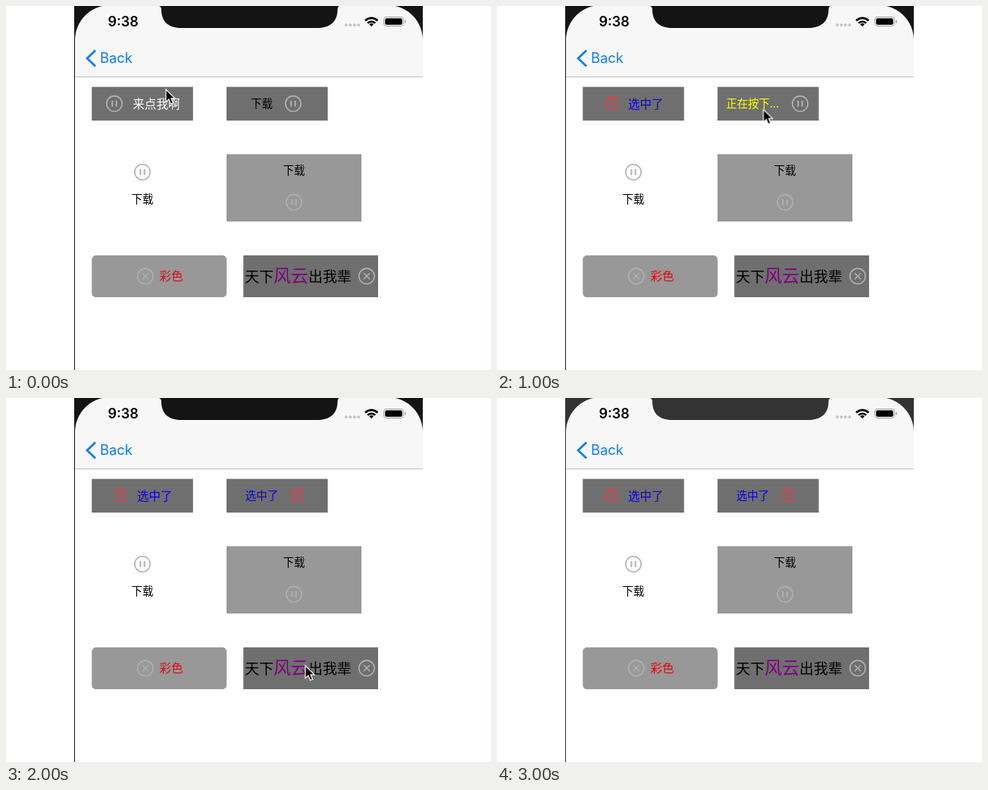
These frames come from a looping animation (640 px wide and 480 px high, 3.5 s). An HTML page:

```html
<!DOCTYPE html>
<html lang="zh-CN">
<head>
<meta charset="utf-8">
<title>Button states</title>
<style>
html, body { margin: 0; width: 100%; height: 100%; overflow: hidden; background: #fff; }
svg { display: block; width: 640px; height: 480px; }
text { font: 15.56px "Noto Sans CJK SC", "Noto Sans CJK", sans-serif; }
.small { font-size: 14.44px; }
.title { font-size: 18.89px; }
.ui { font-family: Inter, sans-serif; }
.dark { fill: #6f6f6f; }
.light { fill: #989898; }
.icon { fill: none; stroke: #b1b1b1; stroke-width: 1.6; }
.trash { fill: none; stroke: #d9444c; stroke-width: 1.5; }
.chosen { fill: #0a00e0; }

/* Seven equal steps of 500 ms, all with hard changes. */
.bezel, .cursor, .state { animation: 3500ms step-end infinite; }
.bezel { fill: #141414; animation-name: bezel; }
.cursor { animation-name: cursor; }
.first-off { animation-name: until1; }
.first-on { animation-name: from1; }
.second-off { animation-name: until2; }
.second-down { animation-name: during2; }
.second-on { animation-name: from3; }
.last-off { animation-name: except3; }
.last-down { animation-name: during3; }

@keyframes bezel { 0% { fill: #141414; } 85.714% { fill: #333; } }
@keyframes until1 { 0% { visibility: visible; } 14.285%, 100% { visibility: hidden; } }
@keyframes from1 { 0% { visibility: hidden; } 14.285%, 100% { visibility: visible; } }
@keyframes until2 { 0% { visibility: visible; } 28.571%, 100% { visibility: hidden; } }
@keyframes during2 { 0% { visibility: hidden; } 28.571% { visibility: visible; } 42.857%, 100% { visibility: hidden; } }
@keyframes from3 { 0% { visibility: hidden; } 42.857%, 100% { visibility: visible; } }
@keyframes during3 { 0% { visibility: hidden; } 42.857% { visibility: visible; } 57.142%, 100% { visibility: hidden; } }
@keyframes except3 { 0% { visibility: visible; } 42.857% { visibility: hidden; } 57.142%, 100% { visibility: visible; } }
@keyframes cursor {
  0% { transform: translate(211px, 110px); visibility: visible; }
  14.285% { transform: translate(347px, 141px); visibility: visible; }
  28.571% { transform: translate(351.5px, 136.5px); visibility: visible; }
  42.857% { transform: translate(395px, 353px); visibility: visible; }
  71.428%, 100% { transform: translate(395px, 353px); visibility: hidden; }
}
</style>
</head>
<body>
<svg viewBox="0 0 640 480">
  <defs>
    <g id="pause">
      <circle r="10.2"/>
      <path d="M-2.7-4V4M2.7-4V4" stroke-width="2"/>
    </g>
    <g id="cross">
      <circle r="10.2"/>
      <path d="M-4-4L4 4M4-4L-4 4"/>
    </g>
    <g id="trash">
      <path d="M-8-4.7H8M-4-4.7V-8H4V-4.7M-6.4-4.7V6Q-6.4 8-4.4 8H4.4Q6.4 8 6.4 6V-4.7M-2.3-1V4M2.3-1V4"/>
    </g>
  </defs>

  <!-- Phone frame and navigation bar -->
  <path class="bezel" d="M90 0H550V45H91V480H90Z"/>
  <path fill="#f7f7f7" d="M91 93V45A46 46 0 0 1 137-1H504A46 46 0 0 1 550 45V93Z"/>
  <path fill="#bdbdbd" d="M91 93H550V94H91Z"/>
  <path class="bezel" d="M202 0Q205 1 205 5C205 20 214 29 231 29H411C428 29 437.5 20 437.5 5Q437.5 1 440 0Z"/>

  <text class="ui" x="134.5" y="27" style="font-size:18px;font-weight:600">9:38</text>
  <g fill="#c4c4c4">
    <circle cx="449" cy="25" r="2"/><circle cx="454.4" cy="25" r="2"/>
    <circle cx="459.8" cy="25" r="2"/><circle cx="465.2" cy="25" r="2"/>
  </g>
  <g fill="none" stroke="#000" stroke-width="2.7">
    <path d="M474 19.3A11.6 11.6 0 0 1 490.4 19.3M477.2 22.6A7 7 0 0 1 487.2 22.6"/>
    <path d="M482.2 27L479.3 24.2A4.2 4.2 0 0 1 485.1 24.2Z" fill="#000" stroke="none"/>
  </g>
  <rect x="498.5" y="14.5" width="26" height="12" rx="3.6" fill="none" stroke="#a0a0a0"/>
  <rect x="500.2" y="16.2" width="22.6" height="8.6" rx="2"/>
  <path d="M526 18.3Q528 19 528 20.5T526 22.7Z" fill="#a0a0a0"/>

  <path d="M118 58.5L107 69L118 79.5" fill="none" stroke="#0e7bf2" stroke-width="2.8"/>
  <text class="ui" x="124" y="75.3" fill="#0e7bf2" style="font-size:18.4px">Back</text>

  <!-- Icon left -->
  <rect class="dark" x="113.2" y="106.7" width="133.6" height="44.4"/>
  <g class="state first-off">
    <use href="#pause" class="icon" x="143" y="128.8"/>
    <text x="167.3" y="134.6" fill="#fff">来点我啊</text>
  </g>
  <g class="state first-on">
    <use href="#trash" class="trash" x="151" y="128.3"/>
    <text class="chosen" x="173" y="134.6">选中了</text>
  </g>

  <!-- Icon right -->
  <rect class="dark" x="291" y="106.7" width="133.6" height="44.4"/>
  <g class="state second-off">
    <text class="small" x="323" y="134.2">下载</text>
    <use href="#pause" class="icon" x="379" y="128.8"/>
  </g>
  <g class="state second-down">
    <text class="small" x="302.3" y="134.2" fill="#ff0">正在按下...</text>
    <use href="#pause" class="icon" x="400" y="128.8"/>
  </g>
  <g class="state second-on">
    <text class="small chosen" x="315.8" y="134.2">选中了</text>
    <use href="#trash" class="trash" x="384.3" y="128.3"/>
  </g>

  <!-- Icon above and below -->
  <use href="#pause" class="icon" x="180" y="219"/>
  <text class="small" x="165.6" y="259.5">下载</text>

  <rect class="light" x="291" y="195.4" width="178" height="88.8"/>
  <text class="small" x="365.5" y="222.2">下载</text>
  <use href="#pause" class="icon" x="380" y="258.8"/>

  <!-- Coloured titles -->
  <rect class="light" x="113.2" y="328.8" width="178" height="55.2" rx="5.5"/>
  <use href="#cross" class="icon" x="183.8" y="356.3"/>
  <text x="202.5" y="362.3" fill="#e8000a">彩色</text>

  <g class="state last-off">
    <rect class="dark" x="313.2" y="328.8" width="177.8" height="55.2"/>
    <text class="title" x="315.3" y="364.2">天下<tspan fill="#800080" font-size="23" style="font-size:23px">风云</tspan>出我辈</text>
    <use href="#cross" class="icon" x="476" y="356.3"/>
  </g>
  <g class="state last-down">
    <rect x="313.2" y="328.8" width="177.8" height="55.2" fill="#00f"/>
    <text class="title" x="311.2" y="366">天下<tspan fill="#ff0" style="font-size:26.67px">风云</tspan>出我辈</text>
    <use href="#trash" class="trash" x="478" y="356.3"/>
  </g>

  <path class="cursor" d="M0 0V16.5L3.9 13L6.5 19.2L9.6 17.9L7 11.9H12Z" stroke="#fff" stroke-width="1.2"/>
</svg>
</body>
</html>
```
